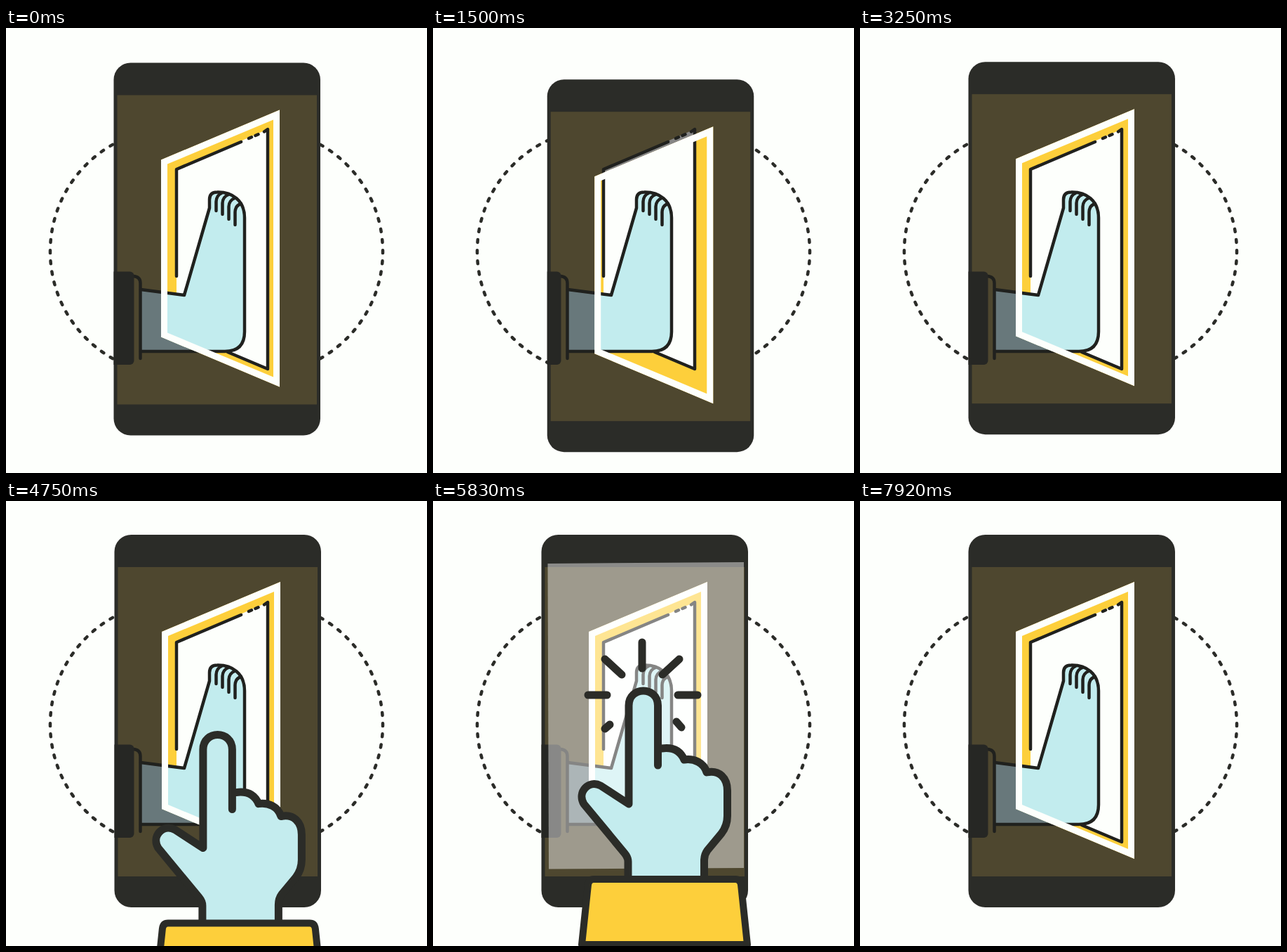
Write an HTML page that moves like this. It is 600 px wide and 633 px high and loops after 8 s.

```html
<!DOCTYPE html>
<html lang="en">
<head>
<meta charset="utf-8">
<title>Phone camera tap</title>
<style>
  html, body { margin: 0; width: 100%; height: 100%; overflow: hidden; background: #fdfffc; }
  svg { display: block; width: 100%; height: 100%; }
  .line { fill: none; stroke: #20211e; stroke-width: 4.5; stroke-linecap: round; stroke-linejoin: round; }
  .dots { stroke: #2b2c28; stroke-width: 4.5; stroke-dasharray: 4 11.23; stroke-dashoffset: 2; }
  .dim { --panel: #868686; --skin: #68787b; }
  .lit { --panel: #fdfffc; --skin: #c2ecee; }
  .panel { fill: var(--panel); }
  .skin { fill: var(--skin); }
  .bold { stroke: #2b2c28; stroke-width: 11; stroke-linecap: round; stroke-linejoin: round; }
</style>
</head>
<body>
<svg viewBox="0 0 600 633">
  <defs>
    <clipPath id="body"><rect class="phone" x="154.5" y="48" width="294.5" height="530"/></clipPath>
    <clipPath id="window"><path class="phone" d="M222 186L391 115V509L222 438Z"/></clipPath>
    <g id="scene">
      <path class="panel" d="M243 201L373 144V485L243 430Z"/>
      <path class="line" d="M243 353V201L335 162M346 157L350 155.3M355.5 153L359.5 151.3M368 147.5L373 144V485L316 461"/>
      <path class="skin line" style="fill:var(--skin)" d="M192 372L254 380L290 256V244Q290 233.500 301 233.500C322 233 340 245 340 270V432Q340 460 312 460H192"/>
      <path class="line" d="M299.500 260V247Q300 238 307 235M308.500 265V249Q309 240 317 237M317.500 272V254Q318 245 326 242M326.500 280V262Q327 252 335 250"/>
    </g>
  </defs>

  <path class="line dots" d="M237.500 143.500A174.500 174.500 0 0 0 237.500 492.500"/>
  <path class="line dots" d="M362.500 143.500A174.500 174.500 0 0 1 362.500 492.500"/>

  <g class="phone">
    <rect x="154.500" y="48" width="294.500" height="530" rx="24" fill="#2b2c28"/>
    <rect x="159.500" y="94" width="284.500" height="440" fill="#4e472f"/>
  </g>
  <g class="dim" clip-path="url(#body)">
    <use href="#scene"/>
    <path class="line" d="M182 353Q191.500 354 191.500 363V470"/>
    <rect x="120" y="346.500" width="62.500" height="132.500" rx="6" fill="#262724"/>
  </g>
  <path class="phone" d="M222 186L391 115V509L222 438Z" fill="#fdcf3b"/>
  <g class="lit" clip-path="url(#window)"><use href="#scene"/></g>
  <path class="phone" fill="#fdfffc" fill-rule="evenodd"
    d="M222 186L391 115V509L222 438ZM231 192V432L382 495V129Z"/>

  <path id="flash" d="M163.500 89L443 87V522L165 523.500Z" fill="#fff"/>
  <g id="rays" class="bold"></g>

  <g id="hand" class="bold">
    <path fill="#c4ecee" stroke="none" d="M278 540V513Q278 507 273 501L215 431C205 414 222 396 239 405L279 431V291C279 263 320.500 263 320.500 291V353C338 349 352 354 358 368C372 366 386 372 390 386C408 382 419.500 394 419.500 412V448Q419.500 462 411 473L391 497Q386.500 503 386.500 512V540Z"/>
    <path fill="none" d="M278 540V513Q278 507 273 501L215 431C205 414 222 396 239 405L279 431V291C279 263 320.500 263 320.500 291V376M326 352C340 350 352 354 358 368C372 366 386 372 390 386C408 382 419.500 394 419.500 412V448Q419.500 462 411 473L391 497Q386.500 503 386.500 512V540"/>
    <path fill="#fdcf3b" stroke-width="10" d="M212 631L221 546Q222 538 229 538H431Q438 538 439 546L448 631Z"/>
  </g>
</svg>
<script>
const LOOP = 8000;
const $ = id => document.getElementById(id);
const phoneParts = document.querySelectorAll('.phone');

// Keys are [time, value]
const phoneX = [[0, 153.5], [400, 161], [760, 167], [920, 166.5], [1670, 161.5], [2170, 157.5], [2500, 155.7], [3300, 154.5]];
const phoneY = [[0, 49.5], [540, 30], [830, 35], [920, 39], [1670, 82], [1930, 91.5], [2170, 86], [2500, 72], [3300, 48]];
const exitX = [[7050, 0], [7500, 90], [7900, 90]];
const exitY = [[6960, 0], [7150, 10], [7470, -123], [7750, 130], [7890, 400]];
const rayGrow = [[5480, 0], [5640, 1]];
const rayFade = [[6000, 0], [6260, 1]];

// Rays run from the inner to the outer end
const rays = [
  [298, 238, 298, 201], [269, 247, 245, 225], [327, 247, 351, 225],
  [248, 276, 221, 276], [349, 276, 377, 276], [252, 318, 245, 324], [347, 314, 354, 322]
].map(ends => {
  const line = document.createElementNS('http://www.w3.org/2000/svg', 'line');
  $('rays').append(line);
  return { line, ends };
});

// Smooth curve through the keys, flat at the ends and at the turning points
function curve(keys, t) {
  const last = keys.length - 1;
  if (t <= keys[0][0]) return keys[0][1];
  if (t >= keys[last][0]) return keys[last][1];
  const slope = i => (keys[i + 1][1] - keys[i][1]) / (keys[i + 1][0] - keys[i][0]);
  const tangent = i => {
    if (i === 0 || i === last) return 0;
    const a = slope(i - 1), b = slope(i);
    return a * b <= 0 ? 0 : (a + b) / 2;
  };
  const i = keys.findIndex(k => k[0] > t) - 1;
  const [t0, v0] = keys[i], [t1, v1] = keys[i + 1];
  const d = t1 - t0, u = (t - t0) / d, w = 1 - u;
  return w * w * (1 + 2 * u) * v0 + u * u * (3 - 2 * u) * v1
    + d * u * w * (w * tangent(i) - u * tangent(i + 1));
}

// The hand shoots up past its place, then springs to rest
function handOffset(t) {
  if (t >= 6960) return [curve(exitX, t), curve(exitY, t)];
  const s = t - 4450;
  const y = s < 0 ? curve([[4110, 370], [4450, -136]], t)
    : -136 * Math.exp(-0.00176 * s) * Math.max(0, 1 - s / 1380) * Math.cos(Math.PI * s / 300);
  return [0.03 * Math.max(0, y), y];
}

function flashOpacity(t) {
  if (t < 5500 || t > 6580) return 0;
  return t < 5580 ? 0.9 * (t - 5500) / 80 : 0.9 * ((6580 - t) / 1000) ** 2.4;
}

function draw(t) {
  const shift = `translate(${curve(phoneX, t) - 154.5} ${curve(phoneY, t) - 48})`;
  phoneParts.forEach(part => part.setAttribute('transform', shift));

  const showHand = t > 4110 && t < 7890;
  $('hand').style.display = showHand ? '' : 'none';
  if (showHand) $('hand').setAttribute('transform', `translate(${handOffset(t)})`);

  $('flash').setAttribute('opacity', flashOpacity(t));

  const from = curve(rayFade, t), to = curve(rayGrow, t);
  $('rays').style.display = to > from ? '' : 'none';
  for (const { line, ends: [x1, y1, x2, y2] } of rays) {
    line.setAttribute('x1', x1 + (x2 - x1) * from);
    line.setAttribute('y1', y1 + (y2 - y1) * from);
    line.setAttribute('x2', x1 + (x2 - x1) * to);
    line.setAttribute('y2', y1 + (y2 - y1) * to);
  }
}

const start = performance.now();
function tick() {
  draw((performance.now() - start) % LOOP);
  requestAnimationFrame(tick);
}
tick();
</script>
</body>
</html>
```
